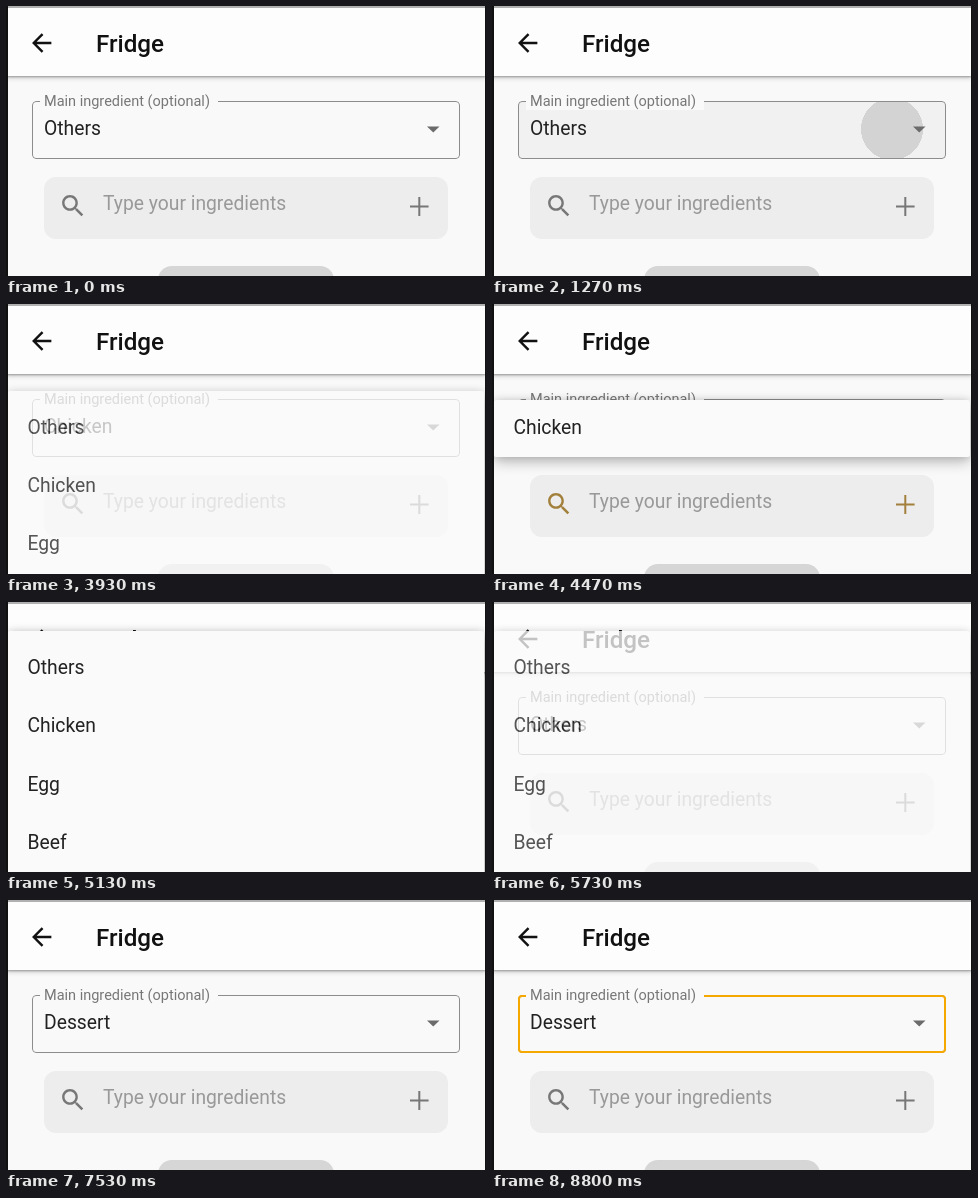
These frames come from a looping animation (480 px wide and 270 px high, 8940 ms). An HTML page:

```html
<!DOCTYPE html>
<html lang="en">
<head>
<meta charset="utf-8">
<title>Fridge</title>
<style>
  html, body { margin: 0; width: 100%; height: 100%; overflow: hidden; }
  #stage {
    position: relative; width: 480px; height: 270px; overflow: hidden;
    background: #f9f9f9; color: #222;
    font: 19.3px/58px Roboto, sans-serif; white-space: nowrap;
  }
  #stage div, #stage svg { position: absolute; box-sizing: border-box; }
  #stage svg { overflow: visible; }
  .bar {
    left: 0; top: 0; width: 480px; height: 70px; background: #fdfdfd;
    box-shadow: 0 1px 2px rgba(0,0,0,.3), 0 2px 5px rgba(0,0,0,.18);
  }
  .title { left: 90px; top: 8.5px; font-size: 24.2px; font-weight: 500; color: #111; }
  .field { left: 26px; top: 95px; width: 428px; height: 58px; border-radius: 4px; overflow: hidden; }
  .fill { inset: 0; background: rgba(0,0,0,.03); }
  .ripple { left: 343px; top: -3px; width: 62px; height: 62px; border-radius: 50%; background: rgba(0,0,0,.12); }
  .line { inset: 0; border: 1px solid #8c8c8c; border-radius: 4px; }
  .focus { left: 26px; top: 95px; width: 428px; height: 58px; border: 2.5px solid #f5a800; border-radius: 4px; }
  .label {
    left: 34px; top: 88px; width: 178px; height: 16px; padding-left: 4px;
    font-size: 14.5px; line-height: 16px; color: #777; background: #f9f9f9;
  }
  .value { left: 38px; top: 94px; }
  .search { left: 38px; top: 171px; width: 404px; height: 62px; border-radius: 12px; background: #ededed; }
  .hint { left: 97px; top: 169px; color: #999; }
  .button { left: 152px; top: 260px; width: 176px; height: 50px; border-radius: 14px; background: #d6d6d6; }
  .menu {
    left: 2px; width: 476px; overflow: hidden; background: #fafafa; border-radius: 2px;
    box-shadow: 0 0 9px rgba(0,0,0,.13), 0 5px 14px rgba(0,0,0,.26);
  }
  .list { left: 19.5px; top: 8px; }
  #stage .list div { position: static; height: 58.4px; }
  .top { left: 0; top: 0; width: 480px; height: 2px; background: #b0b0b0; }
  .side { top: 0; width: 2px; height: 270px; background: #111; }
</style>
</head>
<body>
<div id="stage">
  <div class="field">
    <div class="fill"></div>
    <div class="ripple"></div>
    <div class="line"></div>
  </div>
  <div class="focus"></div>
  <div class="label">Main ingredient (optional)</div>
  <div class="value" id="others">Others</div>
  <div class="value" id="chicken">Chicken</div>
  <div class="value" id="dessert">Dessert</div>
  <div class="search"></div>
  <div class="hint">Type your ingredients</div>
  <div class="button"></div>
  <svg width="480" height="270">
    <path d="M421 120.5h12.5l-6.25 6z" fill="#6b6b6b"/>
    <g id="icons" fill="currentColor">
      <path transform="translate(52.5 185.5) scale(1.208)" d="M15.5 14h-.79l-.28-.27C15.41 12.59 16 11.11 16 9.5 16 5.91 13.09 3 9.5 3S3 5.91 3 9.5 5.91 16 9.5 16c1.61 0 3.09-.59 4.23-1.57l.27.28v.79l5 4.99L20.49 19l-4.99-5zm-6 0C7.01 14 5 11.99 5 9.5S7.01 5 9.5 5 14 7.01 14 9.5 11.99 14 9.5 14z"/>
      <path d="M404 199.5h8.3v-8.5h2v8.5h8.3v2h-8.3v8.5h-2v-8.5h-8.3z"/>
    </g>
  </svg>
  <div class="bar">
    <svg width="480" height="70">
      <path transform="translate(21.2 22.5) scale(1.208)" fill="#111" d="M20 11H7.83l5.59-5.59L12 4l-8 8 8 8 1.41-1.41L7.83 13H20z"/>
    </svg>
    <div class="title">Fridge</div>
  </div>
  <div class="menu" id="low" style="top:86.5px"><div class="list"></div></div>
  <div class="menu" id="high"><div class="list"></div></div>
  <div class="top"></div>
  <div class="side" style="left:0"></div>
  <div class="side" style="left:478.5px"></div>
</div>
<script>
const LOOP = 8940;
const HOLD = 'step-end';
const start = document.timeline.currentTime || 0;
const $ = s => document.querySelector(s);

// Each row: [time in ms, properties, easing towards the next row]
function play(el, rows) {
  const last = rows[rows.length - 1];
  const keys = [...rows, [LOOP, last[1]]].map(([t, props, easing = 'linear']) =>
    ({ offset: t / LOOP, easing, ...props }));
  el.animate(keys, { duration: LOOP, iterations: Infinity }).startTime = start;
}

const fade = (el, rows) => play(el, rows.map(([t, opacity, ease]) => [t, { opacity }, ease]));

for (const list of document.querySelectorAll('.list')) {
  for (const name of ['Others', 'Chicken', 'Egg', 'Beef']) {
    list.appendChild(document.createElement('div')).textContent = name;
  }
}

// Selected value
fade($('#others'), [[0, 1, HOLD], [3870, 0, HOLD], [5730, 1, HOLD], [7070, 0, HOLD]]);
fade($('#chicken'), [[0, 0, HOLD], [3870, 1, HOLD], [5730, 0, HOLD]]);
fade($('#dessert'), [[0, 0, HOLD], [7070, 1, HOLD]]);

// Tap on the field
fade($('.fill'), [[0, 0, HOLD], [1265, 1], [1730, 1], [1865, 0]]);
play($('.ripple'), [
  [0, { opacity: 0, transform: 'scale(1)' }, HOLD],
  [1265, { opacity: 1, transform: 'scale(1)' }],
  [1500, { opacity: 1, transform: 'scale(1)' }, 'ease-out'],
  [1740, { opacity: .4, transform: 'scale(9)' }],
  [1865, { opacity: 0, transform: 'scale(12)' }]
]);
fade($('.focus'), [[0, 0], [7640, 0], [8070, 1]]);
play($('#icons'), [
  [0, { color: '#777' }, HOLD],
  [4465, { color: '#a2803c' }, HOLD],
  [4530, { color: '#777' }, HOLD]
]);

// Menu opened on the first item
const low = (opacity, height = 300) => ({ opacity, height: height + 'px' });
play($('#low'), [
  [0, low(0, 67), HOLD],
  [1865, low(.6, 67), 'ease-out'],
  [2000, low(1)],
  [3870, low(1)],
  [4130, low(0), HOLD],
  [6395, low(1), HOLD],
  [7070, low(1)],
  [7270, low(0), HOLD]
]);

// Menu opened on the second item
const high = (opacity, top, height) => ({ opacity, top: top + 'px', height: height + 'px' });
play($('#high'), [
  [0, high(0, 96, 57), HOLD],
  [4465, high(1, 96, 57)],
  [4950, high(1, 96, 57), 'ease-out'],
  [5125, high(1, 28.5, 300)],
  [5710, high(1, 28.5, 300)],
  [5800, high(0, 28.5, 300), HOLD]
]);
const shift = y => ({ transform: `translateY(${y}px)` });
play($('#high .list'), [
  [0, shift(-67.5)],
  [4950, shift(-67.5), 'ease-out'],
  [5125, shift(0)]
]);
</script>
</body>
</html>
```
